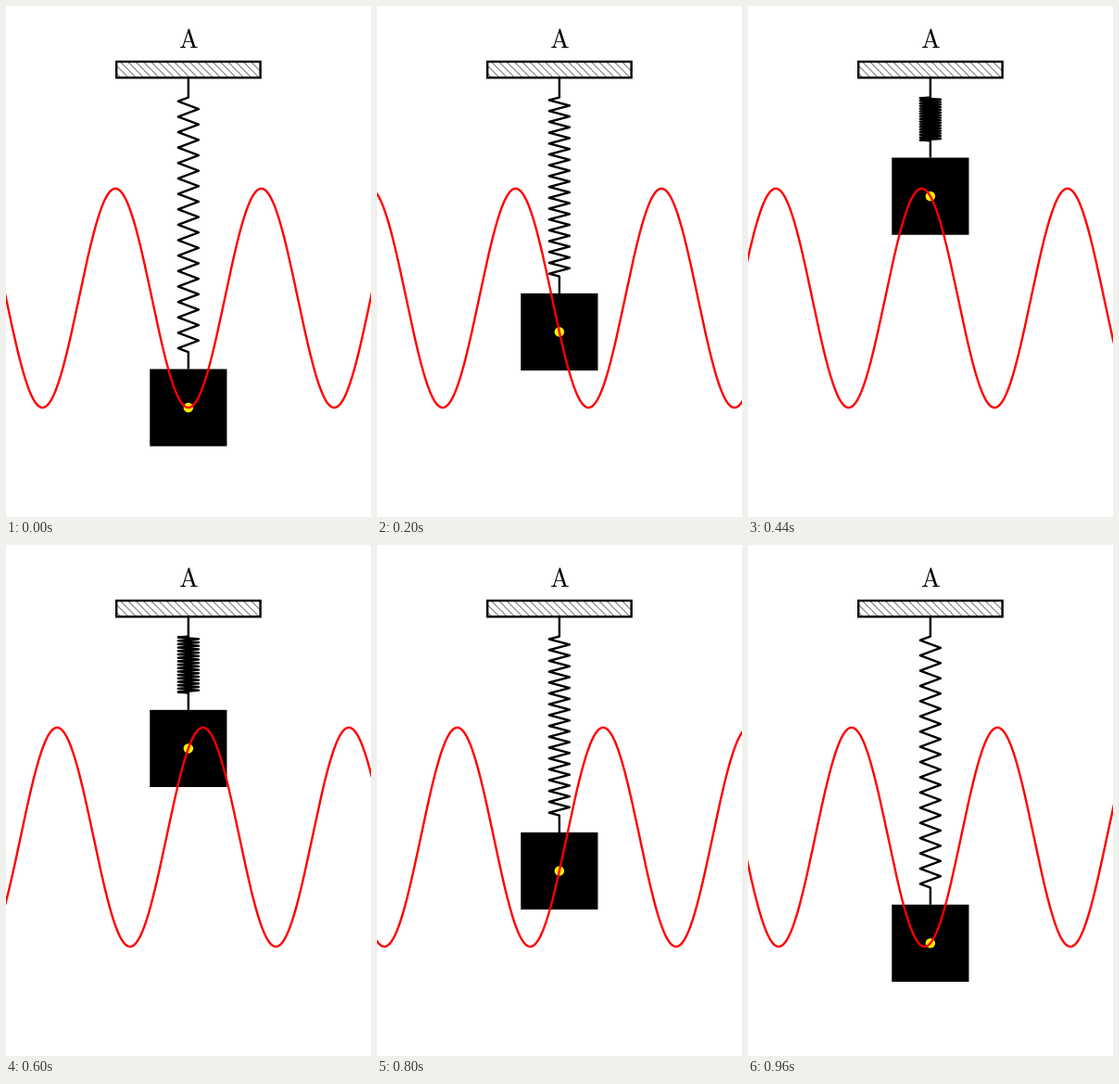
A matplotlib script for the animation above (1 s loop, 394 by 551 pixels).

```python
import numpy as np
import matplotlib.pyplot as plt
from matplotlib.animation import FuncAnimation
from matplotlib.patches import Circle, Rectangle

W, H, DPI = 394, 551, 64
FRAMES, INTERVAL = 25, 40
PX = 72 / DPI  # points per pixel

CM = 78.74
CENTER_X = 2.5 * CM
REST_Y = 4 * CM
AMPLITUDE = 1.5 * CM
WAVELENGTH = 2 * CM

STROKE = 2.4 * PX
BOX = 83.2
SUPPORT = (119.2, 60, 155.4, 17.3)  # x, y, width, height
COIL_TOP = 98.6
COIL_GAP = 18.3
HALF_TURNS = 33
COIL_RADIUS = 11.1
HATCH_STEP = 8.3

fig = plt.figure(figsize=(W / DPI, H / DPI), dpi=DPI, facecolor="white")
ax = fig.add_axes([0, 0, 1, 1])
ax.set_xlim(0, W)
ax.set_ylim(H, 0)
ax.axis("off")


def stroke(xs, ys, color, zorder, width=STROKE):
    line, = ax.plot(xs, ys, color=color, lw=width, zorder=zorder,
                    solid_joinstyle="round", solid_capstyle="butt", snap=False)
    return line


def wave(x, phase):
    return REST_Y + AMPLITUDE * np.cos(2 * np.pi * ((x - CENTER_X) / WAVELENGTH - phase))


def spring(bottom):
    """Zigzag with straight ends, from the support down to the box."""
    k = np.arange(HALF_TURNS)
    coil_end = bottom - COIL_GAP
    ys = COIL_TOP + (k + 0.5) / HALF_TURNS * (coil_end - COIL_TOP)
    xs = CENTER_X + COIL_RADIUS * np.where(k % 2, 1, -1)
    ends = [CENTER_X, CENTER_X]
    return (np.r_[ends, xs, ends],
            np.r_[SUPPORT[1] + SUPPORT[3], COIL_TOP, ys, coil_end, bottom])


def draw_support():
    x, y, w, h = SUPPORT
    frame = Rectangle((x, y), w, h, fill=False, ec="black", lw=STROKE,
                      joinstyle="miter", zorder=2, snap=False)
    ax.add_patch(frame)
    for k in range(72, 94):
        left = k * HATCH_STEP - H + y
        hatch = stroke([left, left + h], [y, y + h], "#808080", 1, 1.1 * PX)
        hatch.set_clip_path(frame)


draw_support()
ax.text(CENTER_X - 0.4, 45.4, r"$\mathrm{A}$", math_fontfamily="cm",
        fontsize=27.67 * PX, ha="center", va="baseline")

wave_x = np.linspace(-2, W + 2, 500)
coil = stroke([], [], "black", 3)
box = ax.add_patch(Rectangle((CENTER_X - BOX / 2, 0), BOX, BOX, fc="black",
                             lw=0, zorder=4, snap=False))
dot = ax.add_patch(Circle((CENTER_X, 0), 5.2, fc="#fff000", lw=0, zorder=5))
curve = stroke([], [], "red", 6)


def update(frame):
    phase = frame / FRAMES
    y = wave(CENTER_X, phase)
    coil.set_data(*spring(y - BOX / 2))
    box.set_y(y - BOX / 2)
    dot.center = (CENTER_X, y)
    curve.set_data(wave_x, wave(wave_x, phase))
    return coil, box, dot, curve


anim = FuncAnimation(fig, update, frames=FRAMES, interval=INTERVAL, repeat=True)
plt.show()
```
